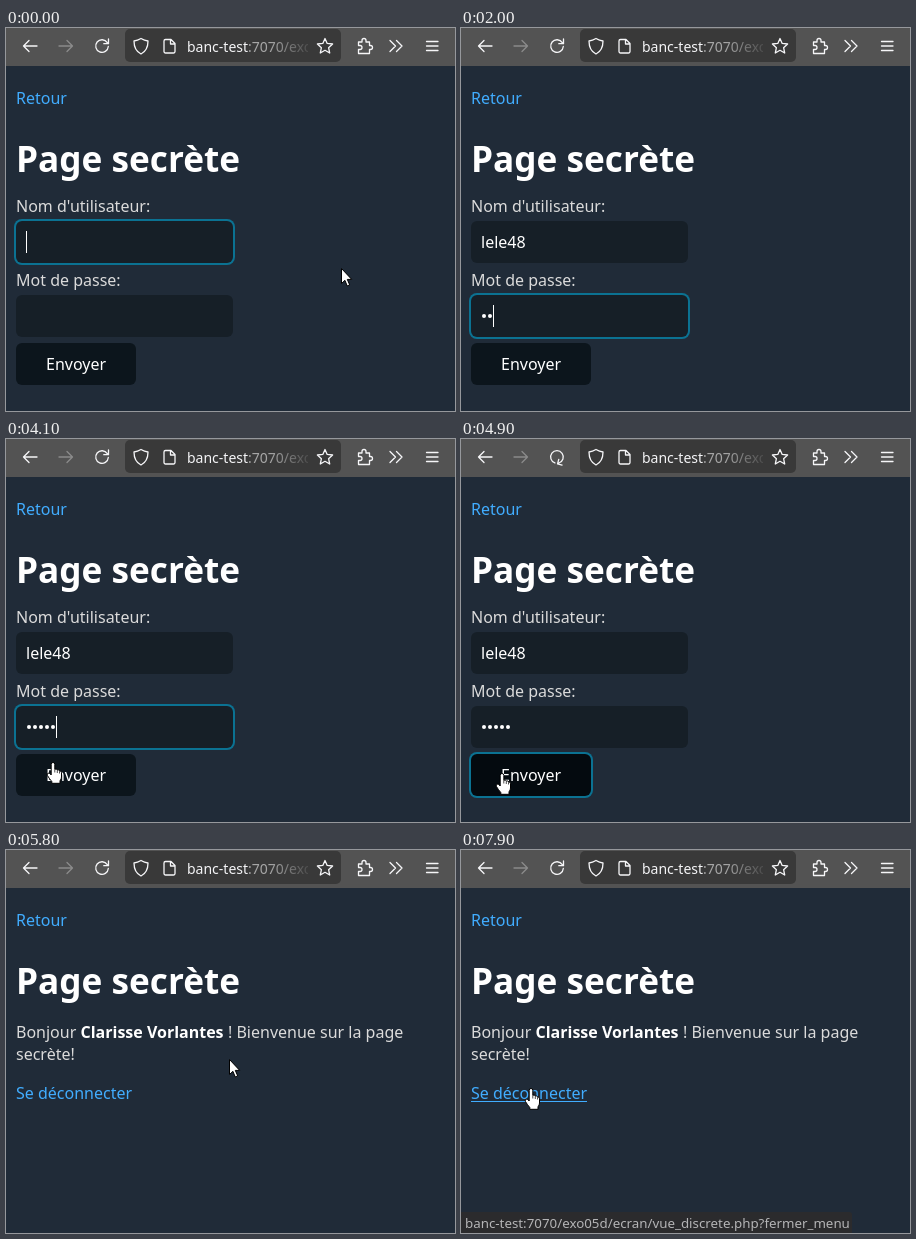
Animation, 449 px wide and 383 px high, one loop 8 s. Source, as an HTML page:

```html
<!DOCTYPE html>
<html lang="fr">
<head>
<meta charset="utf-8">
<title>Page secrète</title>
<style>
  html, body { margin: 0; width: 100%; height: 100%; overflow: hidden; background: #202b38; }
  svg { display: block; width: 449px; height: 383px; }
  text { font-family: "Noto Sans", sans-serif; font-size: 16px; fill: #dbdbdb; white-space: pre; }
  .white { fill: #fff; }
  .link { fill: #41adff; }
  .bold { fill: #fff; font-weight: 700; }
  .icon { fill: none; stroke: #f6f6f8; stroke-width: 1.3; stroke-linecap: round; stroke-linejoin: round; }
  .ring { fill: #0096bf; fill-opacity: .67; }
  .pointer { fill: #fff; stroke: #000; stroke-width: 1; stroke-linejoin: round; }
</style>
</head>
<body>
<svg viewBox="0 0 449 383">
  <defs>
    <linearGradient id="fade" gradientUnits="userSpaceOnUse" x1="264" y1="0" x2="305" y2="0">
      <stop stop-color="#a6a6a6"/>
      <stop offset="1" stop-color="#a6a6a6" stop-opacity=".12"/>
    </linearGradient>
    <clipPath id="field"><rect x="119" y="1" width="183" height="34"/></clipPath>
  </defs>

  <rect width="449" height="383" fill="#202b38"/>

  <!-- toolbar -->
  <rect width="449" height="38" fill="#535353"/>
  <rect x="119" y="1" width="216" height="33" rx="5" fill="#393939"/>
  <g class="icon">
    <path id="back" d="M31 18H17.5M23 12.5L17.5 18L23 23.5"/>
    <path stroke="#8b8b8b" d="M53 18H66.500M61 12.500L66.500 18L61 23.500"/>
    <path id="reload" d="M101.300 14.600A6.300 6.300 0 1 0 102.300 18.500M102.500 11V15.700H97.800"/>
    <path d="M135 10.500C137.500 12 139.500 12.700 142 13C142 19.500 140 23.500 135 26C130 23.500 128 19.500 128 13C130.500 12.700 132.500 12 135 10.500Z"/>
    <path d="M159.500 11.500H165L169 15.500V23.500A1.500 1.500 0 0 1 167.500 25H159.500A1.500 1.500 0 0 1 158 23.500V13A1.500 1.500 0 0 1 159.500 11.500ZM164.500 11.500V16H169"/>
    <path id="star"/>
    <path d="M352.500 14H356V12.500A2 2 0 0 1 360 12.500V14H363.500V17.500H364.500A2 2 0 0 1 364.500 21.500H363.500V25.500H352.500V21.500H354A2 2 0 0 0 354 17.500H352.500Z"/>
    <path d="M384 12.500L389.500 18L384 23.500M390.500 12.500L396 18L390.500 23.500"/>
    <path d="M420.500 13.500H432M420.500 18H432M420.500 22.500H432"/>
  </g>
  <g clip-path="url(#field)">
    <text x="181" y="24" style="font-size:14px;fill:url(#fade)"><tspan fill="#f4f4f6">banc-test</tspan>:7070/exo05d</text>
  </g>

  <!-- shared header -->
  <text class="link" x="10" y="76">Retour</text>
  <text class="bold" x="10" y="144" style="font-size:35.2px">Page secrète</text>

  <g id="login">
    <text x="10" y="184">Nom d'utilisateur:</text>
    <rect id="ring1" class="ring" x="8" y="191" width="221" height="46" rx="8"/>
    <rect x="10" y="193" width="217" height="42" rx="6" fill="#161f27"/>
    <text id="user" class="white" x="20" y="220"></text>
    <text x="10" y="258">Mot de passe:</text>
    <rect id="ring2" class="ring" x="8" y="265" width="221" height="46" rx="8"/>
    <rect x="10" y="267" width="217" height="42" rx="6" fill="#161f27"/>
    <g id="dots" class="white"></g>
    <rect id="caret" class="white" width="1" height="22"/>
    <g id="button">
      <rect id="ring3" class="ring" x="8" y="313" width="124" height="46" rx="8"/>
      <rect id="face" x="10" y="315" width="120" height="42" rx="6"/>
      <text class="white" x="40" y="342">Envoyer</text>
    </g>
  </g>

  <g id="welcome">
    <text x="10" y="188">Bonjour</text>
    <text class="bold" x="74.500" y="188">Clarisse Vorlantes</text>
    <text x="222" y="188">! Bienvenue sur la page</text>
    <text x="10" y="210">secrète!</text>
    <text class="link" x="10" y="249">Se déconnecter</text>
    <rect id="under" class="link" x="10" y="251" width="116" height="1"/>
    <g id="status">
      <path d="M0 362H388Q391 362 391 365V383H0Z" fill="#2b2b2d"/>
      <text x="4" y="378" style="font-size:13.333px;fill:#b4b4b6">banc-test:7070/exo05d/ecran/vue_discrete.php?fermer_menu</text>
    </g>
  </g>

  <g id="pointer">
    <path id="arrow" class="pointer" d="M.5 .5V15.500L3.900 12.300L6.200 17.900L8.700 16.900L6.300 11.400H10.700Z"/>
    <g id="beam" fill="none">
      <path stroke="#000" stroke-width="3" d="M-4.500 -7.500H-1.500L0 -6.500L1.500 -7.500H4.500M0 -6.500V6.500M-4.500 7.500H-1.500L0 6.500L1.500 7.500H4.500"/>
      <path stroke="#fff" stroke-width="1.200" d="M-4.500 -7.500H-1.500L0 -6.500L1.500 -7.500H4.500M0 -6.500V6.500M-4.500 7.500H-1.500L0 6.500L1.500 7.500H4.500"/>
    </g>
    <g id="hand" transform="translate(2 -1)">
      <path class="pointer" d="M-1.800 12V2.300A1.800 1.800 0 0 1 1.800 2.300V7.300Q3.300 6.300 4.300 8Q5.800 7.200 6.500 8.900Q8.500 8.500 8.500 10.800V15Q8.500 17 7 18.800V21.300H-1.200V19.500Q-3.500 17 -5.600 13.400Q-6.300 11.800 -4.900 11.100Q-3.500 10.700 -1.800 13Z"/>
      <path stroke="#000" stroke-width=".7" d="M1.800 7.500V10.500M4.300 8.300V11M6.500 9.200V11.500"/>
    </g>
  </g>
</svg>

<script>
const LOOP = 8000, STEP = 100;
const NAME = "lele48";
const NAME_KEYS = [400, 500, 600, 700, 1000, 1100];
const PASS_KEYS = [1800, 2000, 2100, 2200, 2500];
const SUBMIT = 4700, LOADED = 5000;

// [time, x, y] of the pointer's hot spot
const PATH = [
  [0, 335, 240], [400, 335, 240], [3500, 301, 229], [3600, 301, 229],
  [3800, 95, 280], [4100, 45, 324], [4200, 17, 330], [4300, 39, 335],
  [5300, 39, 335], [5400, 52, 322], [5500, 86, 297], [5800, 223, 209],
  [5900, 272, 188], [6000, 306, 176], [6100, 245, 133], [6200, 127, 150],
  [6400, 97, 183], [6500, 97, 183], [6600, 150, 151], [6700, 220, 158],
  [6800, 258, 180], [6900, 260, 184], [7000, 215, 196], [7200, 50, 204],
  [7400, 72, 206], [7600, 68, 239], [8000, 68, 239]
];

const $ = id => document.getElementById(id);
const show = (id, on) => $(id).setAttribute("display", on ? "inline" : "none");
const count = (keys, t) => keys.filter(k => k <= t).length;
const within = (t, a, b) => t >= a && t < b;
const clamp = v => Math.max(0, Math.min(1, v));
const inBox = ([x, y], l, t, r, b) => x >= l && x <= r && y >= t && y <= b;

// star outline and password dots
$("star").setAttribute("d", "M" + Array.from({ length: 10 }, (_, i) => {
  const a = Math.PI * (i / 5 - .5), r = i % 2 ? 3.8 : 8;
  return (319 + r * Math.cos(a)).toFixed(1) + " " + (18.5 + r * Math.sin(a)).toFixed(1);
}).join("L") + "Z");
$("dots").innerHTML = PASS_KEYS.map((_, i) => `<circle cx="${23 + 6 * i}" cy="288" r="2"/>`).join("");

function pointerAt(t) {
  const i = Math.max(1, PATH.findIndex(p => p[0] > t));
  const [t0, x0, y0] = PATH[i - 1], [t1, x1, y1] = PATH[i];
  const k = (t - t0) / (t1 - t0);
  return [Math.round(x0 + (x1 - x0) * k), Math.round(y0 + (y1 - y0) * k)];
}

function cursorKind(p, welcome) {
  if (inBox(p, 10, 112, 234, 154)) return "beam";
  if (welcome) {
    if (inBox(p, 10, 171, 397, 193) || inBox(p, 10, 193, 68, 215)) return "beam";
    return inBox(p, 10, 232, 126, 254) ? "hand" : "arrow";
  }
  if (inBox(p, 10, 315, 130, 357)) return "hand";
  return inBox(p, 10, 267, 227, 309) || inBox(p, 10, 193, 227, 235) ? "beam" : "arrow";
}

function drawForm(t) {
  const typed = count(NAME_KEYS, t), hidden = count(PASS_KEYS, t);
  const second = clamp((t - 1500) / 200);
  const third = t >= SUBMIT ? 1 : 0;
  $("user").textContent = NAME.slice(0, typed);
  [...$("dots").children].forEach((d, i) => d.setAttribute("display", i < hidden ? "inline" : "none"));
  $("ring1").setAttribute("opacity", 1 - second);
  $("ring2").setAttribute("opacity", second * (1 - third));
  $("ring3").setAttribute("opacity", third);
  $("face").setAttribute("fill", t >= 4200 ? "#040a0f" : "#0c151c");
  $("button").setAttribute("transform", `translate(0 ${within(t, SUBMIT, SUBMIT + 200) ? 2 : 0})`);

  const inName = t < 1600;
  const x = inName ? (typed ? 20 + $("user").getComputedTextLength() : 20) : 20 + 6 * hidden;
  $("caret").setAttribute("x", Math.round(x));
  $("caret").setAttribute("y", inName ? 203 : 277);
  show("caret", !within(t, 2800, 3800) && !third);
}

function draw(now) {
  const t = Math.floor(now % LOOP / STEP) * STEP;
  const welcome = t >= LOADED;
  show("login", !welcome);
  show("welcome", welcome);
  if (!welcome) drawForm(t);
  show("under", t >= 7600);
  show("status", t >= 7800);
  $("reload").setAttribute("transform", `rotate(${within(t, 4900, LOADED) ? 105 : 0} 96 18)`);

  const p = pointerAt(t), kind = cursorKind(p, welcome);
  show("pointer", t < 400 || within(t, 3500, 3600) || t >= 3800);
  $("pointer").setAttribute("transform", `translate(${p})`);
  for (const id of ["arrow", "beam", "hand"]) show(id, id === kind);
}

let start;
function tick(now) {
  start ??= now;
  draw(now - start);
  requestAnimationFrame(tick);
}
draw(0);
requestAnimationFrame(tick);
</script>
</body>
</html>
```
